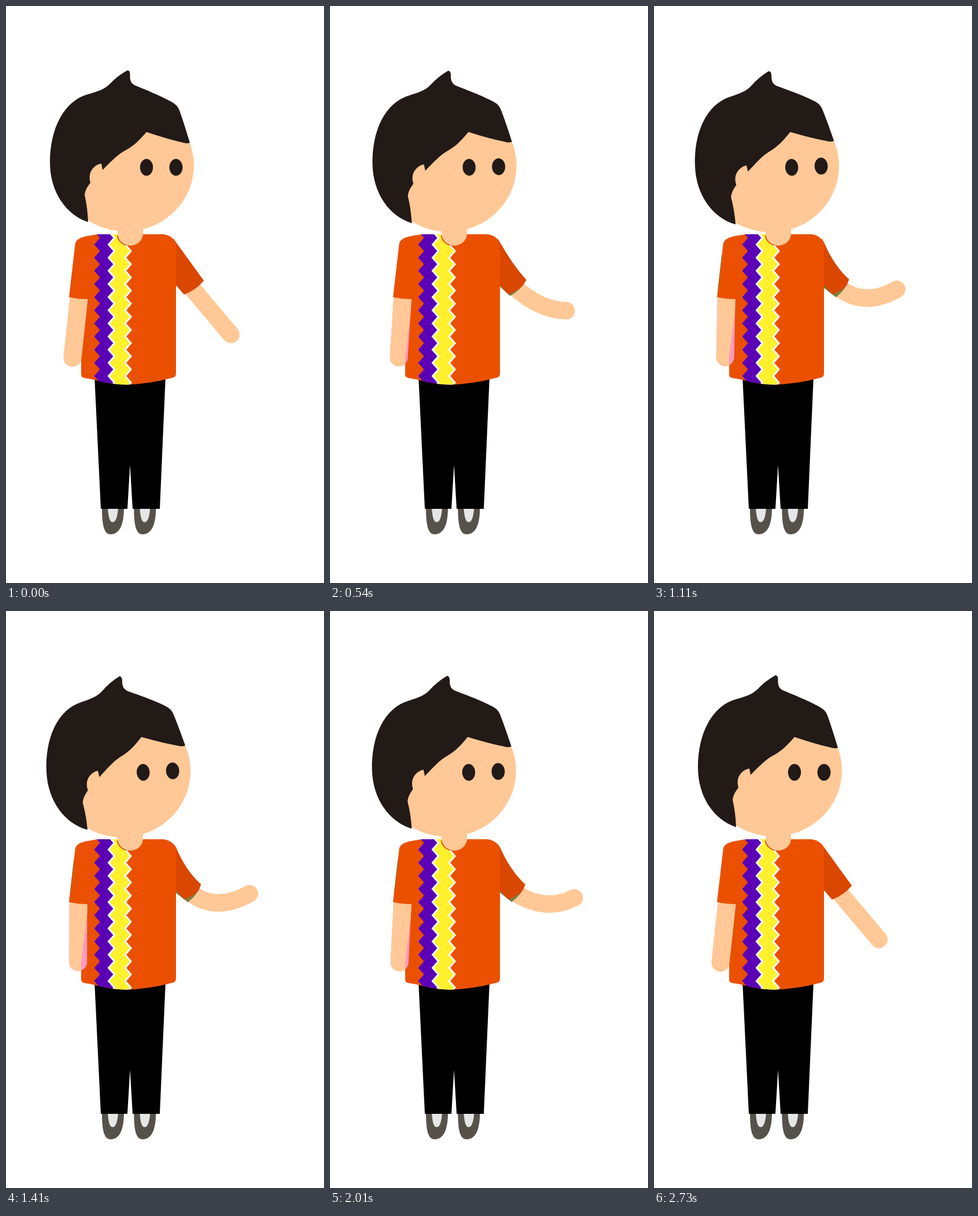
Recreate the animation shown at these times as an HTML page with a canvas. Size 550x996 px, loop 2.76 s.

```html
<!DOCTYPE html>
<html lang="en">
<head>
<meta charset="utf-8">
<title>Boy raising his arm</title>
<style>
html, body { margin: 0; width: 100%; height: 100%; overflow: hidden; background: #fff; }
canvas { display: block; }
</style>
</head>
<body>
<canvas id="stage" width="550" height="996"></canvas>
<script>
const ctx = document.getElementById('stage').getContext('2d');
const LOOP = 2760, STEP = 30, LAST = LOOP - STEP;

const SKIN = '#ffc896', HAIR = '#221a17', SHIRT = '#ea5000', SLEEVE = '#da4700';
const PURPLE = '#5b00b5', YELLOW = '#fff02d', PINK = '#ff98c0', OLIVE = '#7d7d3c';
const SHOE = '#56524a', TONGUE = '#e6e6e6';

const hair = new Path2D('M210 111C213 111 215 114 214.5 120C214 129 217 134 223 137' +
  'C240 144 270 156 287 166Q296 171 299 178Q304 190 318 236Q312 238 305 235.5Q280 230 243 217.5' +
  'C231 231 222 241 206 249.5C196 255 190 260 167 283L165 272C156 273 147 281 145 291' +
  'C144 297 145 301 146 305C142 310 137 317 136 326C139 340 141 352 142 373' +
  'C103 360 76 320 76 270C76 212 100 163 143 152C160 147 170 144 179 135Q192 121 210 111Z');
const torso = new Path2D('M160 394H270Q285 394 294 408V634Q294 640 289 641.5' +
  'Q245 653 208 653.5Q180 653.5 152 645L135 642Q130 641 130 636V430Q130 396 160 394Z');
const leftSleeve = new Path2D('M162 394C140 397 121 398 119.5 412L109 502.5Q125 506 142 506L160 420Z');
const neck = new Path2D('M193 380H237V393C237 404 227 413.5 215 413.5S193 404 193 393Z');
const pants = new Path2D('M153 638L164 868H210L214.5 792L219 868H266L276 638Z');
const shoe = new Path2D('M166 866C166 895 169 912 181 912C196 912 204 896 204 866Z');
const tongue = new Path2D('M176 866C177 881 179 891 184.5 891S193 881 194 866Z');

// time, bend x, bend y, hand x, hand y
const armKeys = [
  [0, 353.5, 525, 389, 567],
  [300, 353, 525.5, 402, 544],
  [810, 375, 525, 416, 506],
  [1080, 366, 520, 420, 489],
  [1410, 363.5, 520, 421, 488],
  [1620, 368, 520, 423, 491],
  [2010, 375, 520, 422.5, 495],
  [2340, 367, 518, 430, 484],
  [2730, 353.5, 525, 389, 567]
];

const mix = (a, b, k) => a + (b - a) * k;

function armPose(t) {
  let i = 1;
  while (i < armKeys.length - 1 && armKeys[i][0] < t) i++;
  const a = armKeys[i - 1], b = armKeys[i];
  const k = (t - a[0]) / (b[0] - a[0]);
  return a.map((v, n) => mix(v, b[n], k)).slice(1);
}

function fill(path, color) {
  ctx.fillStyle = color;
  ctx.fill(path);
}

function limb(path, color, width = 30) {
  ctx.strokeStyle = color;
  ctx.lineWidth = width;
  ctx.lineCap = 'round';
  ctx.stroke(path);
}

function clipped(path, draw) {
  ctx.save();
  ctx.clip(path);
  draw();
  ctx.restore();
}

function oval(x, y, rx, ry, color) {
  ctx.beginPath();
  ctx.ellipse(x, y, rx, ry, 0, 0, 2 * Math.PI);
  ctx.fillStyle = color;
  ctx.fill();
}

// Band between two parallel zigzags
function band(left, right, color) {
  const half = 11.35, top = 389, rows = 25;
  const p = new Path2D();
  const x = (base, i) => base + (i % 2 ? 10 : 0);
  for (let i = 0; i < rows; i++) p.lineTo(x(left, i), top + i * half);
  for (let i = rows - 1; i >= 0; i--) p.lineTo(x(right, i), top + i * half);
  p.closePath();
  fill(p, color);
}

function rightSleeve(p) {
  return new Path2D(`M290 402L294 408Q${318 - 8 * p} ${441 + 7 * p} ` +
    `${342 - 5 * p} ${474 - 2 * p}Q${329 + 2 * p} ${490 + p} ` +
    `${308 + 7 * p} ${498 + 5 * p}L294 ${482 + 5 * p}L290 ${478 + 5 * p}Z`);
}

const restSleeve = rightSleeve(0);

function drawRightArm(t) {
  const [bx, by, hx, hy] = armPose(t);
  const p = (567 - hy) / 83;
  const arm = new Path2D(`M${318 + 3 * p} ${483 + 5 * p}Q${bx} ${by} ${hx} ${hy}`);
  const sleeve = rightSleeve(p);
  limb(arm, SKIN);
  if (p > 0.05) {
    clipped(restSleeve, () => limb(arm, PINK));
    fill(sleeve, OLIVE);
  }
  clipped(restSleeve, () => fill(sleeve, SLEEVE));
  if (p < 0.05) fill(sleeve, SLEEVE);
}

function drawLeftArm(k) {
  const arm = new Path2D(`M${127 - 2 * k} 495L${115 + 10 * k} ${607 - k}`);
  const rest = new Path2D('M0 0H142.5V506L130 607V996H0Z');
  limb(arm, k > 0.05 ? PINK : SKIN, 31);
  clipped(rest, () => limb(arm, SKIN, 31));
  fill(leftSleeve, SHIRT);
  if (k > 0.45) {
    ctx.strokeStyle = OLIVE;
    ctx.lineWidth = 1;
    ctx.lineCap = 'butt';
    ctx.stroke(new Path2D('M117.5 430L111 488'));
  }
}

function drawLegs() {
  for (const dx of [0, 55.3]) {
    ctx.save();
    ctx.translate(dx, 0);
    fill(shoe, SHOE);
    fill(tongue, TONGUE);
    ctx.restore();
  }
  fill(pants, '#000');
}

function drawStripes() {
  clipped(torso, () => {
    band(152.5, 177, PURPLE);
    band(175.5, 208, '#fff');
    band(179.5, 204, YELLOW);
  });
}

function drawNeck() {
  ctx.strokeStyle = SLEEVE;
  ctx.lineWidth = 3;
  ctx.lineCap = 'butt';
  ctx.stroke(new Path2D('M193 396Q195 408 208 412.5'));
  fill(neck, SKIN);
}

function drawHead(k) {
  ctx.save();
  ctx.translate(240, 395);
  ctx.rotate(-0.051 * k);
  ctx.translate(-240, -395);
  oval(207, 275, 118, 114, SKIN);
  fill(hair, HAIR);
  oval(243, 278.5, 11.2, 14.5, HAIR);
  oval(294, 278.5, 11.4, 14.5, HAIR);
  ctx.restore();
}

function draw(t) {
  const sway = 1 - Math.abs(t / LAST * 2 - 1);
  ctx.fillStyle = '#fff';
  ctx.fillRect(0, 0, 550, 996);
  drawLegs();
  drawRightArm(t);
  fill(torso, SHIRT);
  drawLeftArm(sway);
  drawStripes();
  drawNeck();
  drawHead(sway);
}

const start = performance.now();
function tick() {
  const t = (performance.now() - start) % LOOP;
  draw(Math.floor(t / STEP) * STEP);
  requestAnimationFrame(tick);
}
tick();
</script>
</body>
</html>
```
